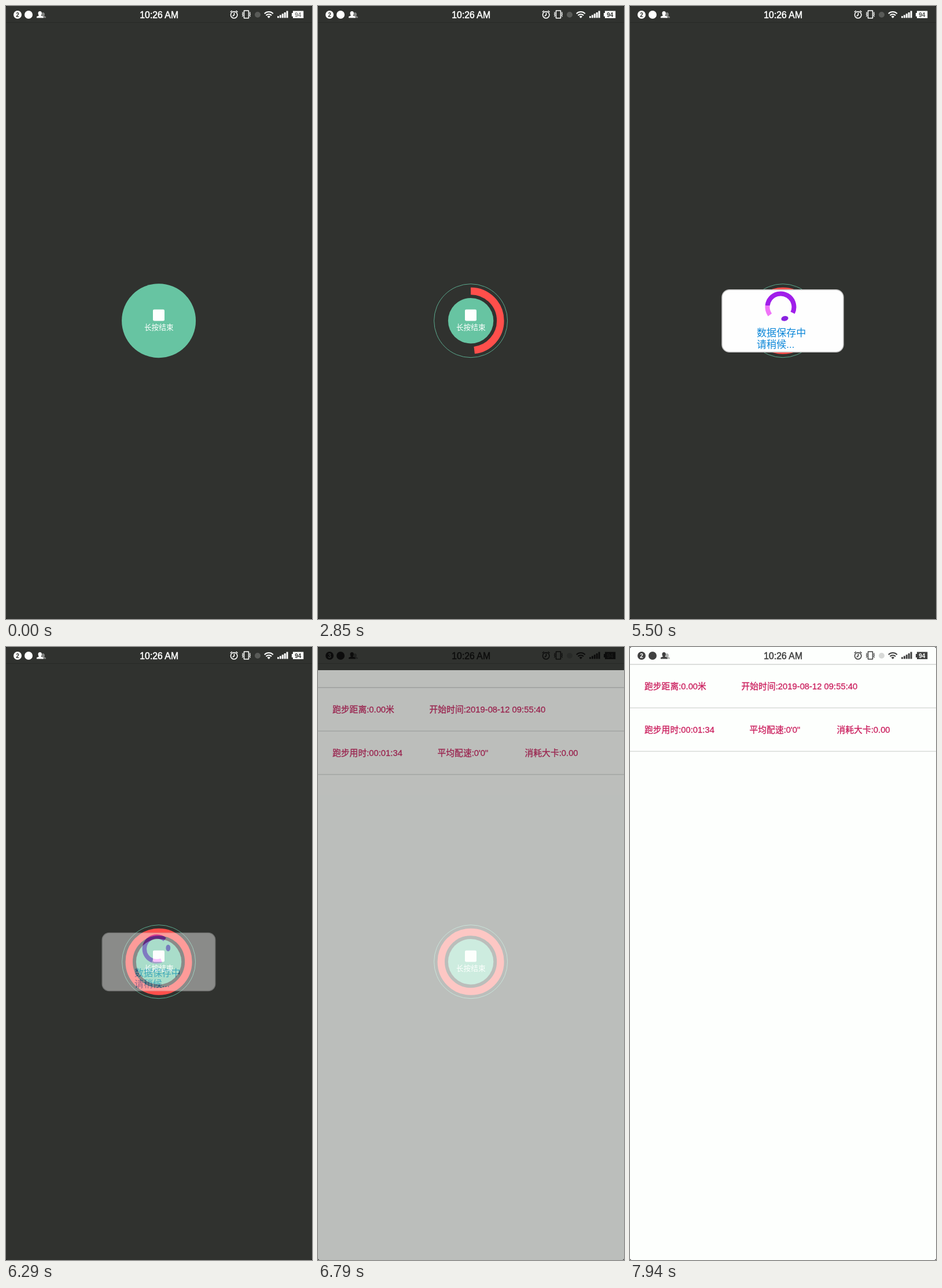
These frames come from a looping animation (529 by 1058 pixels, 8110 ms). An HTML page:

```html
<!DOCTYPE html>
<html lang="zh-CN">
<head>
<meta charset="utf-8">
<title>长按结束</title>
<style>
html, body { margin: 0; width: 100%; height: 100%; overflow: hidden; background: #30322f; }
svg { display: block; width: 100%; height: 100%; }
text { font-family: "Liberation Sans", "Noto Sans CJK SC", "Noto Sans CJK", sans-serif; }
.solid { fill: currentColor; }
.line { fill: none; stroke: currentColor; stroke-width: 1.6; }
.digits { font-size: 10px; font-weight: bold; text-anchor: middle; }
#page text { font-size: 14.8px; fill: #cb1f5e; stroke: #cb1f5e; stroke-width: .3; }
#dialog text { font-size: 17.1px; fill: #0a86d8; }
#spinner circle { fill: none; stroke-width: 8; }
</style>
</head>
<body>
<svg viewBox="0 0 529 1058">
  <rect width="529" height="1058" fill="#30322f"/>
  <rect y="28" width="529" height="1" fill="#272926"/>

  <g id="button">
    <circle id="outline" cx="264.1" cy="543.2" r="63.5" fill="none" stroke="#5aa88d"/>
    <circle id="progress" cx="264.1" cy="543.2" r="51.3" fill="none" stroke="#ff4f4b" stroke-width="12.5"
      pathLength="360" transform="rotate(-90 264.1 543.2)"/>
    <circle id="disc" cx="264.1" cy="543.2" r="64" fill="#67c4a2"/>
    <rect x="254" y="523.7" width="20" height="19.8" rx="2.2" fill="#fefffe"/>
    <text x="264.3" y="559" font-size="12.7" text-anchor="middle" fill="#fefffe">长按结束</text>
  </g>

  <g id="dialog">
    <rect x="159" y="489.7" width="210" height="107.6" rx="13" fill="#fefefe" stroke="#c4c4c4" stroke-width="1.5"/>
    <g id="spinner">
      <circle cx="260.5" cy="519.5" r="23" stroke="#a01eea" pathLength="360" stroke-dasharray="0 110 200 50"/>
      <circle cx="260.5" cy="519.5" r="23" stroke="#f074f8" pathLength="360" stroke-dasharray="0 68 42 250"/>
      <ellipse cx="281.5" cy="517.5" rx="4.2" ry="6.2" fill="#8a22e0"/>
    </g>
    <text x="219" y="569.5">数据保存中</text>
    <text x="219" y="590">请稍候...</text>
  </g>

  <g id="page">
    <rect width="529" height="1158" fill="#fdfffd"/>
    <g fill="#dcdedc">
      <rect y="29" width="529" height="2"/>
      <rect y="104.3" width="529" height="1.6"/>
      <rect y="179.3" width="529" height="1.6"/>
    </g>
    <text x="25" y="73">跑步距离:0.00米</text>
    <text x="192.5" y="73">开始时间:2019-08-12 09:55:40</text>
    <text x="25" y="148">跑步用时:00:01:34</text>
    <text x="206.5" y="148">平均配速:0'0"</text>
    <text x="357.5" y="148">消耗大卡:0.00</text>
  </g>

  <g id="status">
    <circle class="solid" cx="20" cy="15" r="7"/>
    <text id="badge" class="digits" x="20" y="18.6"></text>
    <circle class="solid" cx="39" cy="15" r="7"/>
    <path class="solid" opacity=".4" d="M62 12a3 3.6 0 0 1 5 2q0 2-1 3l3 1.5V20.5H62z"/>
    <path class="solid" d="M55.5 12.5a3.2 3.6 0 0 1 6.4 0q0 2.5-1.4 4l4 1.7V20.5H53V18.2l4-1.7q-1.5-1.5-1.5-4z"/>
    <text class="solid" x="264.7" y="20.6" font-size="15.8" text-anchor="middle" stroke="currentColor" stroke-width=".55">10:26 AM</text>
    <g class="line">
      <circle cx="394.2" cy="15.3" r="5.7"/>
      <path d="M394.5 11.5V15.5L391.8 17.5M387.8 10.5l3-2.5M400.6 10.5l-3-2.5"/>
      <rect x="411.5" y="8" width="8" height="13" rx=".5"/>
      <path stroke-width="1.2" d="M408.5 10.5l1.2 1.8-1.2 1.8 1.2 1.8-1.2 2.5M422.5 10.5l-1.2 1.8 1.2 1.8-1.2 1.8 1.2 2.5"/>
      <path stroke-width="2" d="M446.8 13.2a10.5 10.5 0 0 1 15 0M449.5 16.2a6.7 6.7 0 0 1 9.6 0"/>
    </g>
    <circle class="solid" cx="435" cy="15" r="5" opacity=".2"/>
    <path class="solid" d="M451.6 18.3a3.6 3.6 0 0 1 5.4 0L454.3 21z"/>
    <path class="solid" d="M469 17.5h3v3h-3zM472.9 15.5h3v5h-3zM476.8 13.3h3v7.2h-3zM480.7 11h3v9.5h-3zM484.6 8.5h3v12h-3z"/>
    <path class="solid" d="M496 8.5H514.3V21H496V18H494V12H496z"/>
    <text id="battery" class="digits" x="504.7" y="18.5">94</text>
  </g>

  <path d="M0 0H3Q0 0 0 3zM529 0V3Q529 0 526 0zM0 1058V1055Q0 1058 3 1058zM529 1058H526Q529 1058 529 1055z" fill="#111"/>
</svg>
<script>
const LOOP = 8110;
const PRESS = 740, DIALOG_IN = 5130, DIALOG_OUT = 6215, PAGE_FADE = 6705, PAGE_SLIDE = 6715;

const $ = id => document.getElementById(id);
const set = (id, attrs) => {
  for (const name in attrs) $(id).setAttribute(name, attrs[name]);
};
const ramp = (t, start, length) => Math.min(1, Math.max(0, (t - start) / length));

// Linear interpolation through [time, value] pairs.
function follow(points, t) {
  let value = points[0][1];
  for (let i = 1; i < points.length; i++) {
    const [t0, v0] = points[i - 1], [t1, v1] = points[i];
    if (t >= t0) value = v0 + (v1 - v0) * ramp(t, t0, t1 - t0);
  }
  return value;
}

const sweep = [[760, 0], [2370, 130], [2850, 173], [3180, 201], [4000, 273], [4850, 338], [5120, 360]];
const batteryFade = [[0, .6], [370, 1], [740, 1], [1540, .2], [2370, .5], [2850, 1], [4050, 1],
  [4850, .25], [5660, 1], [6610, 1], [6740, .35], [7180, .2], [7330, .2], [7740, 1]];

function draw(t) {
  const pressed = t >= PRESS;
  set('disc', { r: pressed ? 39.2 : 64 });
  set('outline', { opacity: pressed ? 1 : 0 });
  set('progress', { 'stroke-dasharray': `${follow(sweep, t)} 720`, opacity: pressed ? 1 : 0 });

  const shown = ramp(t, DIALOG_IN, 150) - ramp(t, DIALOG_OUT, 135);
  const scale = .878 + .122 * shown;
  set('dialog', {
    opacity: shown,
    transform: `translate(264 543.5) scale(${scale}) translate(-264 -543.5)`
  });
  set('spinner', { transform: `rotate(${(t - 6290) * .36} 260.5 519.5)` });

  const top = Math.round(85 * (1 - ramp(t, PAGE_SLIDE, 340)) ** 3);
  set('page', { opacity: ramp(t, PAGE_FADE, 126), transform: `translate(0 ${top})` });

  const darkIcons = t >= 6765;
  const knockout = top < 15 ? '#fdfffd' : '#30322f';
  set('status', { color: darkIcons ? '#000' : '#fefffe', opacity: darkIcons ? .74 : 1 });
  set('badge', { fill: knockout });
  set('battery', { fill: knockout, opacity: follow(batteryFade, t) });
  $('badge').textContent = t >= 6400 && t < 7000 ? 3 : 2;
}

function tick() {
  draw(performance.now() % LOOP);
  requestAnimationFrame(tick);
}
tick();
</script>
</body>
</html>
```
